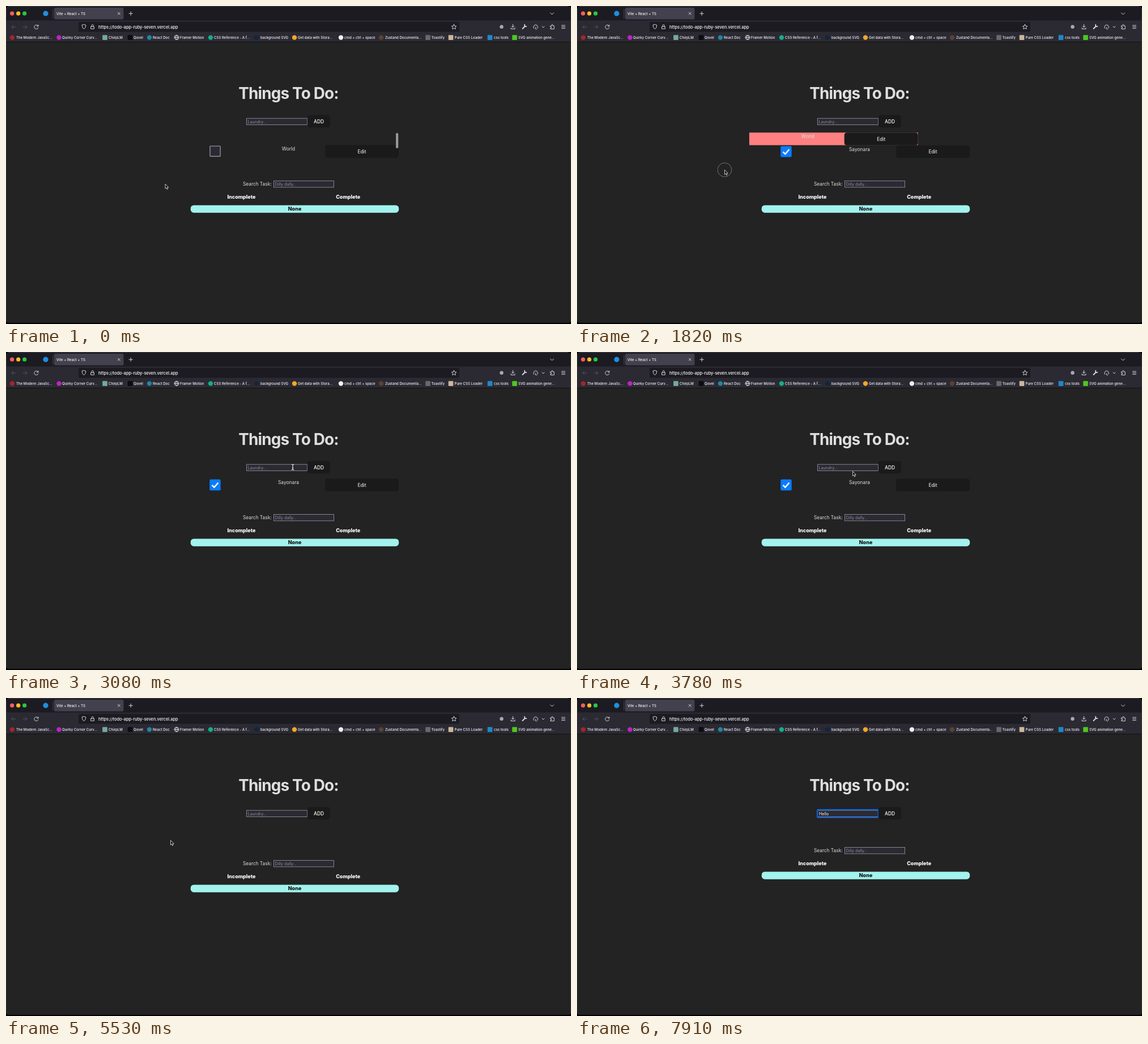
Write an HTML page that moves like this. It is 997 by 561 pixels and loops after 8000 ms.

```html
<!DOCTYPE html>
<html lang="en">
<head>
<meta charset="utf-8">
<title>Things To Do</title>
<style>
  html, body { margin: 0; width: 100%; height: 100%; overflow: hidden; background: #000; }
  svg { display: block; width: 100vw; height: 100vh; }
  text { font-family: Inter, "Open Sans", sans-serif; fill: #dedede; white-space: pre; }
  .line { fill: none; stroke: #dcdce2; stroke-width: .95; stroke-linecap: round; stroke-linejoin: round; }
  .dim { stroke: #56555f; }
</style>
</head>
<body>
<svg id="stage" viewBox="0 0 997 561" xmlns="http://www.w3.org/2000/svg"></svg>
<script>
const LOOP = 8000, STEP = 70;
const ROW = 22.4, LIST_X = 304, LIST_Y = 223.3, LIST_RIGHT = 693;
const PAGE = '#232323', FIELD = '#2b2a33', BUTTON = '#1a1a1a';

const rect = (x, y, w, h, fill, more = '') =>
  `<rect x="${x}" y="${y}" width="${w}" height="${h}" fill="${fill}" ${more}/>`;
const circle = (x, y, r, fill, more = '') =>
  `<circle cx="${x}" cy="${y}" r="${r}" fill="${fill}" ${more}/>`;
const line = (d, cls = '') => `<path class="line ${cls}" d="${d}"/>`;
const text = (x, mid, size, str, more = '') =>
  `<text x="${x}" y="${mid + size * 0.36}" font-size="${size}" ${more}>${str}</text>`;
const centred = (x, mid, size, str, more = '') =>
  text(x, mid, size, str, `text-anchor="middle" ${more}`);

const bookmarks = [
  [11, '#a3262b', 18, 'The Modern JavaSc...'],
  [93.5, '#c224c0', 99, 'Quirky Corner Curv...'],
  [174.5, '#74aa9c', 181, 'ChirpLM', 1],
  [219, '#0d0d10', 225, 'Qovel', 1],
  [253, '#1f86a5', 259, 'React Doc'],
  [301, 'globe', 307, 'Framer Motion'],
  [361, '#10b08a', 367, 'CSS Reference - A f...'],
  [442, '#10263f', 449, 'background SVG'],
  [509, '#f9a825', 515, 'Get data with Stora...'],
  [591, '#f2f2f2', 597, 'cmd + ctrl + space'],
  [662, '#5c4232', 669, 'Zustand Documenta...'],
  [744.5, '#68686e', 750.5, 'Toastify', 1],
  [785, '#cbb79c', 791.5, 'Pure CSS Loader', 1],
  [854, '#1e88c8', 861, 'css tools', 1],
  [897.5, '#4fc71f', 904, 'SVG animation gene...', 1]
];

function bookmark([x, color, tx, label, square]) {
  let icon;
  if (color === 'globe') {
    icon = line(`M${x - 4} 55.5a4 4 0 1 0 8 0a4 4 0 1 0 -8 0h8M${x} 51.5q-4 4 0 8q4 -4 0 -8`);
  } else {
    icon = square ? rect(x - 4.3, 51.3, 8.6, 8.6, color, 'rx="1"') : circle(x, 55.6, 4.2, color);
  }
  return icon + text(tx, 55.5, 6.1, label, 'font-weight="500" style="fill:#f4f4f8"');
}

function browser() {
  const lights = ['#ff5f57', '#febc2e', '#28c840'];
  return rect(0, 0, 997, 561, '#000') +
    rect(0.5, 0.5, 996, 558.5, PAGE, 'rx="4"') +
    `<path d="M0.5 26V5q0 -4 4 -4H992q4 0 4 4V26z" fill="#1c1b22"/>` +
    rect(0.5, 25.5, 996, 37.5, FIELD) +
    rect(0.5, 63, 996, 1, '#111114') +
    rect(4, 0.3, 988, 0.7, '#55545c') +
    rect(0, 4, 0.6, 553, '#4a4a4c') + rect(996, 4, 0.6, 553, '#4a4a4c') +
    lights.map((c, i) => circle(10.7 + 11 * i, 13.2, 3.6, c)).join('') +
    circle(70, 13.2, 4.6, '#1d8fe0') +
    rect(82.6, 5, 0.8, 17, '#55545f') +
    rect(85, 3, 122.5, 20.5, '#42414d', 'rx="2.5"') +
    text(89, 13.6, 6.15, 'Vite + React + TS', 'font-weight="500" style="fill:#fbfbfe"') +
    line('M197.4 11.4l3.8 3.8m0 -3.8l-3.8 3.8') +
    line('M217 13.3h6.4m-3.2 -3.2v6.4') +
    line('M960.5 12l3 3l3 -3') +
    line('M17 37h-7m3 -3l-3 3l3 3', 'dim') + line('M30 37h7m-3 -3l3 3l-3 3', 'dim') +
    line('M56.6 35.2a3.6 3.6 0 1 0 0.3 3M57 33.4v2.3h-2.4') +
    rect(128, 28, 672, 17.5, '#1c1b22', 'rx="2.5"') +
    line('M137.5 32.6l3.4 1.2q0 5 -3.4 7q-3.4 -2 -3.4 -7z') +
    line('M150 36.3h5.4v4h-5.4zM151.1 36.3v-1.8a1.6 1.6 0 0 1 3.2 0v1.8') +
    text(163, 37, 7.35, 'https://todo-app-ruby-seven.vercel.app', 'font-weight="500" style="fill:#fbfbfe"') +
    line('M790.5 32.4l1.3 2.8l3 .4l-2.2 2.1l.6 3l-2.7 -1.5l-2.7 1.5l.6 -3l-2.2 -2.1l3 -.4z') +
    circle(874.5, 36.8, 3.2, '#a9a9b0') +
    line('M894.5 32.5v5.2m-2.3 -2.2l2.3 2.3l2.3 -2.3M891 38.5v2h7v-2') +
    `<path class="line" style="stroke-width:1.8" d="M911.5 40l4 -4m-.3 -3v3.2h3"/>` +
    line('M931.6 39.5a3.8 3.8 0 1 1 6 0M934.6 37.5v3l1.6 .6') +
    line('M946 36l2 2l2 -2') +
    line('M960.8 35h2v-1.1a1.1 1.1 0 0 1 2.2 0v1.1h2.2v5.6h-6.4v-1.8h1a1 1 0 0 0 0 -2h-1z') +
    line('M980.5 34.2h6m-6 2.6h6m-6 2.6h6') +
    bookmarks.map(bookmark).join('');
}

function field(x, y, w, label, more = '') {
  return rect(x, y, w, 11.3, FIELD, 'stroke="#858492" stroke-width="1"') +
    text(x + 2, y + 5.9, 7.2, label, `style="fill:#8d8c98" ${more}`);
}

function taskRow(id, label, done) {
  const box = done
    ? rect(359.3, 1.5, 19.4, 19.4, '#0a7cff', 'rx="2"') +
      '<path d="M363.6 11.6l3.8 3.9l7 -8.2" fill="none" stroke="#fff" stroke-width="2.4"/>'
    : rect(360, 2.2, 18.2, 18.2, FIELD, 'rx="1" stroke="#8f8f9d" stroke-width="1.4"');
  return `<g id="${id}">` +
    rect(LIST_X, 0, LIST_RIGHT - LIST_X, 22.2, '#ff8080', `id="${id}Tint"`) +
    box + centred(498.5, 7, 8.4, label) +
    rect(563, 0, 130, 22.4, BUTTON, 'rx="4.5"') +
    centred(628, 11.6, 8.4, 'Edit', 'font-weight="500"') + '</g>';
}

function app() {
  const bold = 'font-weight="800" style="fill:#fff"';
  return centred(498.5, 153.7, 27.9, 'Things To Do:', 'font-weight="700" letter-spacing="-0.83"') +
    field(424.5, 198.2, 107, 'Laundry...', 'id="hint"') +
    `<g id="focus">${rect(424, 197, 107.6, 13.8, 'none', 'rx="1" stroke="#0a63dd" stroke-width="2"')}` +
    text(427, 204, 7.2, '', 'id="typed" style="fill:#fbfbfe"') +
    '<rect id="caret" y="199.5" width="0.8" height="9" fill="#fbfbfe"/></g>' +
    rect(531.8, 192.5, 40.2, 21.8, BUTTON, 'rx="4.5"') +
    centred(552, 203.6, 8.4, 'ADD', 'font-weight="500" style="fill:#fff"') +
    `<clipPath id="clip"><rect id="view" x="${LIST_X}" y="223" width="${LIST_RIGHT - LIST_X}"/></clipPath>` +
    `<g clip-path="url(#clip)">${taskRow('world', 'World', false)}${taskRow('bye', 'Sayonara', true)}` +
    '<rect id="thumb" x="688" y="224" width="4.2" rx="2" fill="#989898"/></g>' +
    '<g id="lower">' + text(418, 314, 8.3, 'Search Task:') +
    field(472.5, 308.5, 106, 'Dilly dally...') +
    centred(415.5, 336.3, 9, 'Incomplete', bold) + centred(603.7, 336.3, 9, 'Complete', bold) +
    rect(325.8, 351.5, 367.4, 13.2, '#a2f2ed', 'rx="5.5"') +
    centred(509.5, 358.2, 9, 'None', 'font-weight="800" style="fill:#111"') + '</g>';
}

const pointer = '<g id="cursor">' +
  '<circle id="ring" r="12.2" fill="none" stroke="#c4c4c4" stroke-width="1" stroke-dasharray="1.2 1.1"/>' +
  '<path id="arrow" d="M0 0V8.2L1.9 6.5L3.2 9.4L4.6 8.8L3.3 6H5.8Z" fill="#111" stroke="#eee" stroke-width=".8"/>' +
  '<path id="beam" d="M-2.3 -4.8Q0 -4.8 0 -3.4Q0 -4.8 2.3 -4.8M0 -3.6V3.6M-2.3 4.8Q0 4.8 0 3.4Q0 4.8 2.3 4.8M-1 1.6H1" ' +
  'fill="none" stroke="#f2f2f2" stroke-width="1.1"/></g>';

document.getElementById('stage').innerHTML = browser() + app() + pointer;
const el = {};
document.querySelectorAll('[id]').forEach(n => el[n.id] = n);

// time, x, y
const path = [
  [0, 281, 314], [210, 385, 282], [420, 520, 231], [490, 526, 229], [1050, 526, 229],
  [1120, 503, 232], [1190, 468.5, 239.7], [1330, 400, 255], [1500, 330, 272], [1680, 270, 286],
  [1820, 260.5, 289], [1960, 258, 289], [2170, 330, 262], [2380, 490, 205], [2450, 503, 201],
  [2660, 506, 203], [3570, 506, 203], [3780, 486.5, 210.5], [3920, 486.5, 210.5],
  [4340, 500, 222], [4620, 505, 234], [4830, 505, 234], [4970, 420, 240], [5110, 310, 248],
  [5250, 255, 253], [5390, 256, 254], [5530, 290.5, 251], [5670, 476, 199.7], [LOOP, 476, 199.7]
];

const clamp = v => Math.max(0, Math.min(1, v));
const show = (node, on) => node.setAttribute('display', on ? 'inline' : 'none');
const within = (t, a, b) => t >= a && t < b;

function cursorAt(t) {
  const i = Math.max(1, path.findIndex(p => p[0] >= t));
  const [t0, x0, y0] = path[i - 1], [t1, x1, y1] = path[i];
  const k = clamp((t - t0) / (t1 - t0));
  return [x0 + (x1 - x0) * k, y0 + (y1 - y0) * k];
}

// cubic-bezier(.4, 0, .1, 1)
function layoutEase(x) {
  let lo = 0, hi = 1;
  for (let i = 0; i < 20; i++) {
    const s = (lo + hi) / 2, r = 1 - s;
    if (1.2 * r * r * s + 0.3 * r * s * s + s * s * s < x) lo = s; else hi = s;
  }
  return lo * lo * (3 - 2 * lo);
}
const slide = (t, start) => ROW * (1 - layoutEase(clamp((t - start) / 450)));

// Elastic drag to the left, one step behind the cursor; then the row flies out
function dragOf(t, press, release) {
  if (t < press) return 0;
  const pull = at => Math.max(0, 0.35 * (cursorAt(press)[0] - cursorAt(at - STEP)[0]));
  if (t < release) return pull(t);
  return pull(release) + 420 * clamp((t - release) / 280);
}

function placeRow(name, drag, y, alive) {
  show(el[name], alive);
  el[name].setAttribute('transform', `translate(${-drag} ${y})`);
  el[name + 'Tint'].setAttribute('opacity', clamp((drag - 2) / 89));
}

const keys = [6790, 7070, 7210, 7280, 7490];
const caretX = [426.3, 432.4, 436.7, 438.5, 440.3, 444.6];

function draw(t) {
  const firstGone = 2400, secondGone = 5600;
  const rows = t < firstGone ? 2 : t < secondGone ? 1 : 0;
  const offset = rows === 2 ? slide(t, -50) : rows === 1 ? slide(t, firstGone) : 0;
  const viewH = rows * ROW + 0.5;

  placeRow('world', dragOf(t, 840, 1960), LIST_Y + offset, rows === 2);
  placeRow('bye', dragOf(t, 4760, 5250), LIST_Y + offset + (rows === 2 ? ROW : 0), rows > 0);
  el.view.setAttribute('height', viewH);
  show(el.thumb, offset > 0.5);
  el.thumb.setAttribute('height', viewH / (1 + 0.7 * offset / ROW));
  el.lower.setAttribute('transform', `translate(0 ${Math.round((rows - 2) * ROW)})`);

  const count = keys.filter(k => t >= k).length;
  show(el.focus, t >= 5950);
  show(el.hint, count === 0);
  el.typed.textContent = 'Hello'.slice(0, count);
  show(el.caret, within(t, 6160, 6650) || within(t, 6790, 7910));
  el.caret.setAttribute('x', caretX[count]);

  const [x, y] = cursorAt(t);
  const overField = x > 424 && x < 532 && y > 196 && y < 210;
  show(el.cursor, t < 6790);
  el.cursor.setAttribute('transform', `translate(${x} ${y})`);
  show(el.ring, within(t, 840, 1960) || within(t, 4760, 5250));
  show(el.beam, overField);
  show(el.arrow, !overField);
}

const begin = performance.now();
function tick() {
  const t = (performance.now() - begin) % LOOP;
  draw(Math.floor(t / STEP) * STEP);
  requestAnimationFrame(tick);
}
draw(0);
requestAnimationFrame(tick);
</script>
</body>
</html>
```
